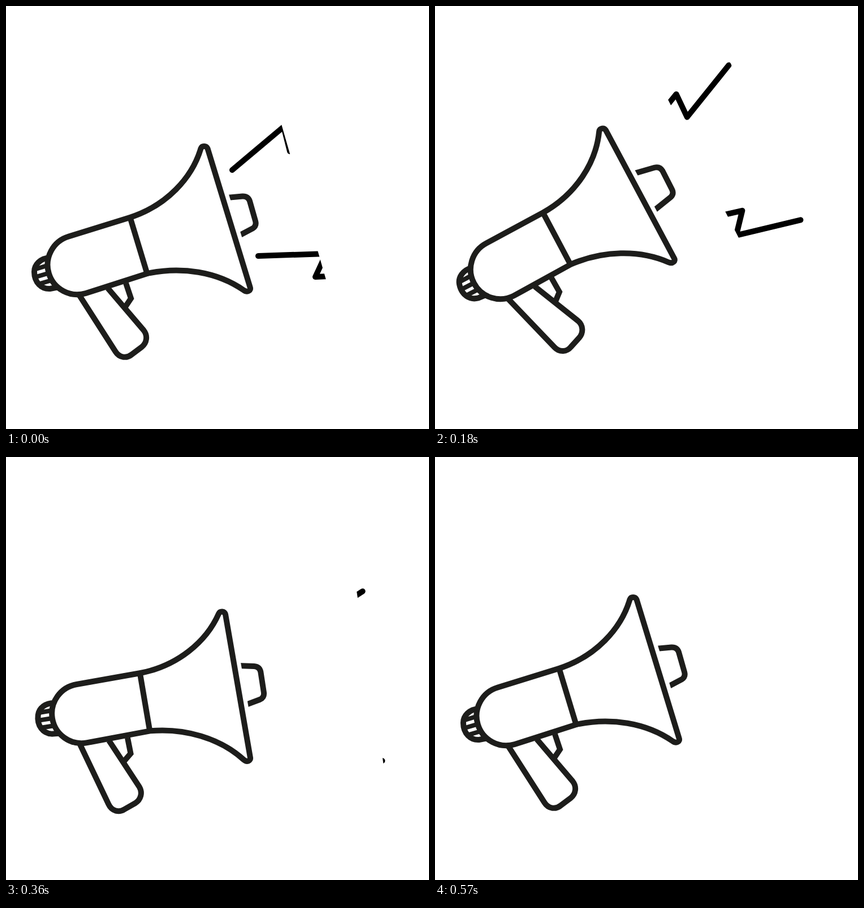
An HTML page without scripts for the animation above (600 ms loop, 748 by 748 pixels).

```html
<!DOCTYPE html>
<html lang="en">
<head>
<meta charset="utf-8">
<title>Megaphone</title>
<style>
  @property --t {
    syntax: "<number>";
    inherits: true;
    initial-value: 0;
  }

  html, body {
    margin: 0;
    width: 100%;
    height: 100%;
    overflow: hidden;
    background: #fff;
  }

  /* --t counts 20 ticks of 30 ms */
  .stage {
    position: relative;
    width: 748px;
    height: 748px;
    overflow: hidden;
    animation: tick 600ms steps(20) -1ms infinite;
  }
  @keyframes tick {
    from { --t: 0; }
    to { --t: 20; }
  }

  /* three eased swings: up, down, back to rest */
  .swing {
    --up: clamp(0, var(--t) / 7, 1);
    --down: clamp(0, (var(--t) - 7) / 6, 1);
    --back: clamp(0, (var(--t) - 13) / 6, 1);
    transform-origin: 162px 516.5px;
    transform: rotate(calc(
      -5.83deg * (1 - cos(180deg * var(--up)))
      + 10.1deg * (1 - cos(180deg * var(--down)))
      - 4.27deg * (1 - cos(180deg * var(--back)))
    ));
  }

  .swing, .sound, svg {
    position: absolute;
    left: 0;
    top: 0;
    width: 748px;
    height: 748px;
  }

  /* slanted window sliding outwards over the bolts */
  .sound {
    --x: calc(294px + 19.6px * var(--t));
    clip-path: polygon(
      var(--x) 0,
      calc(var(--x) + 133px) 0,
      calc(var(--x) + 347.7px) 748px,
      calc(var(--x) + 214.7px) 748px
    );
  }

  /* front loop pops out along the axis: a long push, then a short one */
  .loop {
    --out1: clamp(0, (var(--t) - 1) / 7, 1);
    --in1: clamp(0, (var(--t) - 8) / 2, 1);
    --out2: clamp(0, (var(--t) - 12) / 4, 1);
    --in2: clamp(0, (var(--t) - 16) / 3, 1);
    --push: calc(
      6.5px * (cos(180deg * var(--in1)) - cos(180deg * var(--out1)))
      + 2.5px * (cos(180deg * var(--in2)) - cos(180deg * var(--out2)))
    );
    fill: none;
    transform: translate(calc(0.958 * var(--push)), calc(-0.287 * var(--push)));
  }

  path { stroke-width: 10; }
  .horn { fill: #fff; stroke: #1d1d1b; }
  .bolts { fill: none; stroke: #000; stroke-linecap: round; stroke-linejoin: round; }
  .ribs { stroke-width: 8; }
</style>
</head>
<body>
<div class="stage">
  <div class="swing">
    <svg class="horn" viewBox="0 0 748 748">
      <clipPath id="ahead"><path d="M374 268H490V480H439Z"/></clipPath>
      <!-- knob -->
      <path d="M78 445C60 446 50 458 50 470C50 489 63 501 78 500L93 497"/>
      <path class="ribs" d="M53 465L76 458M53 479L77 472M60 491L84 484"/>
      <!-- trigger and handle -->
      <path d="M212 490L221 517L211 532"/>
      <path d="M130 512L193.5 611C201 623 214 623 222 616.5L240 603C249 596 251 583 243.5 573.5L180 499"/>
      <!-- body and bell -->
      <path d="M344.5 252C329 304 284 353 219 374L111 407.5A52 52 0 0 0 141 508L250 473C310 460 374 470 421 503C427 507 434 503 431.5 497L356.5 252C354 246.5 346.5 246.5 344.5 252Z"/>
      <path d="M219.5 374L249.5 473"/>
      <!-- front loop -->
      <g clip-path="url(#ahead)">
        <path class="loop" d="M374 340.5L418 336.500Q428 336 431 345L441 380Q443.500 389 436 393.500L396 414.500"/>
      </g>
    </svg>
    <div class="sound">
      <svg class="bolts" viewBox="0 0 748 748">
        <path d="M400 290L491 213.5L502 257L592 181"/>
        <path d="M446 442L566 438L547 479L664 474"/>
      </svg>
    </div>
  </div>
</div>
</body>
</html>
```
